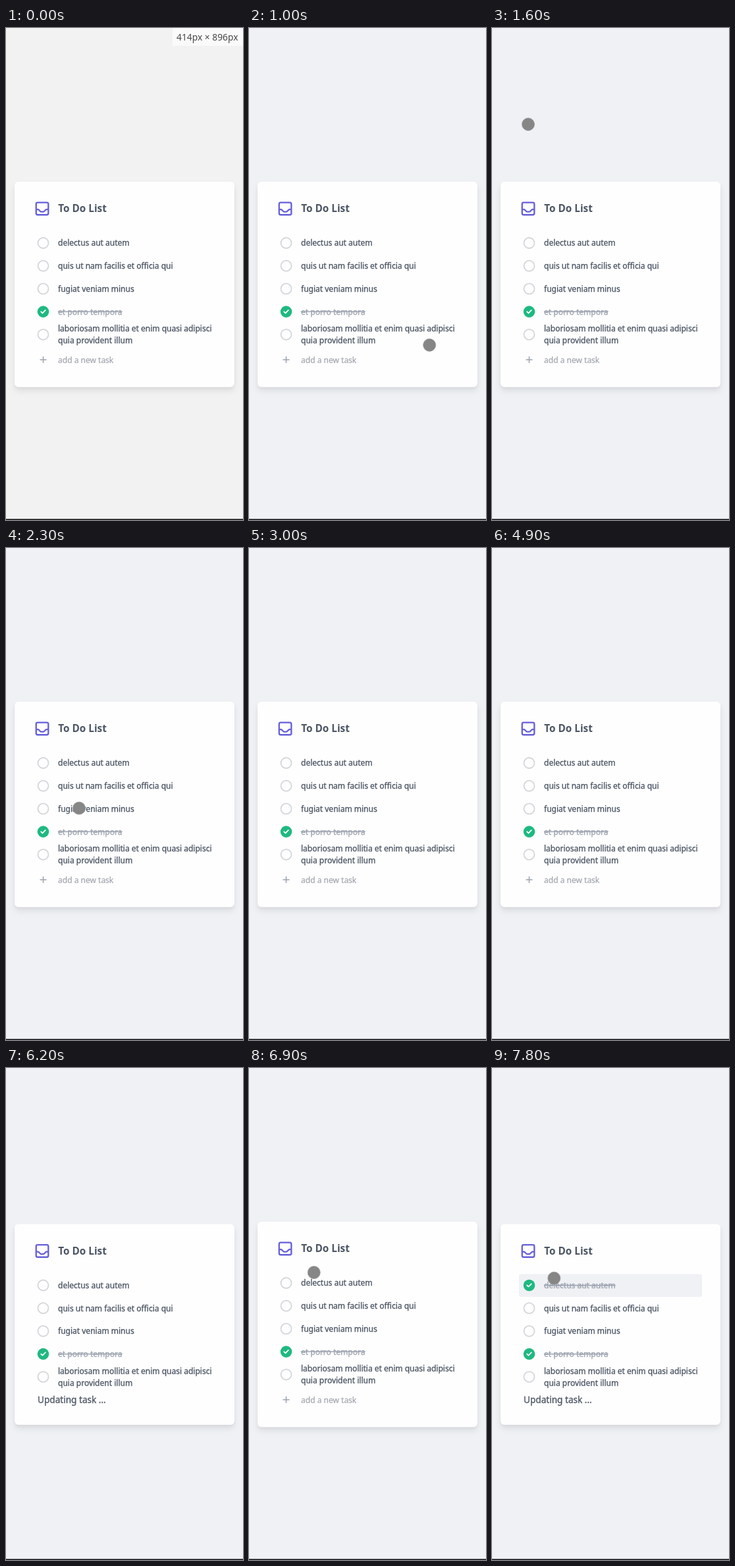
Animation, 360 px wide and 746 px high, one loop 8 s. Source, as an HTML page:

```html
<!DOCTYPE html>
<html lang="en">
<head>
<meta charset="utf-8">
<title>To Do List</title>
<style>
  html, body { margin: 0; width: 100%; height: 100%; overflow: hidden; background: #f0f1f5; }
  svg { display: block; }
  text {
    font: 500 12.02px "Noto Sans", "Open Sans", sans-serif;
    color: #4b5563; fill: currentColor; stroke: currentColor; stroke-width: .32;
  }
  .title { font-size: 15.3px; font-weight: 700; stroke: none; }
  .status { font-size: 13.6px; }
  .muted { color: #a0a4ae; stroke-width: .2; }
  .tag { font-size: 13.8px; font-weight: 400; color: #484848; stroke: none; }
  .ring { fill: #fefefe; stroke: #d3d6db; stroke-width: 1.8; }
  .tick { display: none; }
  .done text { color: #9ca3af; text-decoration: line-through; }
  .done .ring { display: none; }
  .done .tick { display: inline; }
  #card { fill: #fefefe; filter: drop-shadow(0 6px 5px rgba(0,0,0,.08)) drop-shadow(0 2px 2px rgba(0,0,0,.04)); }
</style>
</head>
<body>
<svg width="360" height="746" viewBox="0 0 360 746">
  <rect id="page" width="360" height="746"/>
  <rect id="card" x="13" width="334" rx="6"/>
  <g id="head">
    <path transform="translate(41.1 -13.9) scale(1.16)" fill="none" stroke="#665fd8" stroke-width="2" stroke-linecap="round" stroke-linejoin="round"
      d="M4 13V6a2 2 0 0 1 2-2H18a2 2 0 0 1 2 2V18a2 2 0 0 1-2 2H6a2 2 0 0 1-2-2ZM4 13h2.6a1 1 0 0 1 .7.3l2.4 2.4a1 1 0 0 0 .7.3h3.2a1 1 0 0 0 .7-.3l2.4-2.4a1 1 0 0 1 .7-.3H20"/>
    <text class="title" x="79.3" y="5.4">To Do List</text>
  </g>
  <g id="list"><rect id="hover" x="41" y="309" width="278" height="34.5" rx="3" fill="#f0f1f5"/></g>
  <g id="add">
    <path d="M51.5 503h10M56.5 498v10" stroke="#9ca3af" stroke-width="1.5"/>
    <text class="muted" x="79" y="507.8">add a new task</text>
  </g>
  <text id="updating" class="status" x="48" y="507.7">Updating task ...</text>
  <text id="loading" class="status" x="41" y="416.7">Loading...</text>
  <g id="size">
    <rect x="253" width="107" height="27" fill="#fafafa"/>
    <text class="tag" x="259" y="18.5">414px × 896px</text>
  </g>
  <circle id="touch" r="9.5" fill="#868686" stroke="#969696" stroke-width=".8"/>
  <rect y="744.4" width="360" height="1.6" fill="#16161a"/>
</svg>
<script>
const LOOP = 8000, STEP = 100;
const FIRST_ROW = 326, ROW = 34.7, LINE = 17.8;
const $ = id => document.getElementById(id);

const tasks = [
  'delectus aut autem',
  'quis ut nam facilis et officia qui',
  'fugiat veniam minus',
  'et porro tempora',
  'laboriosam mollitia et enim quasi adipisci|quia provident illum'
];

// Pointer gestures: each eases along a curve (start, bend, end), then rests until it leaves.
const gestures = [
  { from: 900, to: 1600, until: 2000, curve: [[300, 489], [60, 420], [55, 146]] },
  { from: 2000, to: 2600, until: 2700, curve: [[55, 146], [187, 700], [15, 32]] },
  { from: 3800, to: 4500, until: 4600, curve: [[226, 111], [226, 200], [241, 273]] },
  { from: 4600, to: 4800, until: 4900, curve: [[241, 273], [310, 273], [307, 19]] },
  { from: 6900, to: 7400, until: LOOP, curve: [[98.7, 310], [71, 366], [94.3, 318.7]] }
];

const rows = tasks.map((task, i) => {
  const lines = task.split('|');
  const y = FIRST_ROW + i * ROW;
  const baseline = y + 4.4 - (lines.length - 1) * LINE / 2;
  const row = document.createElementNS('http://www.w3.org/2000/svg', 'g');
  row.innerHTML = `<g transform="translate(56.5 ${y})">
      <circle class="ring" r="8"/>
      <g class="tick"><circle r="8.8" fill="#1fb981"/>
      <path d="M-3.3 0l2.2 2.2 4.4-4.4" fill="none" stroke="#fff" stroke-width="1.8" stroke-linecap="round" stroke-linejoin="round"/></g>
    </g>` + lines.map((s, n) => `<text x="79" y="${baseline + n * LINE}">${s}</text>`).join('');
  $('list').append(row);
  return row;
});
rows[3].classList.add('done');

const show = (id, on) => $(id).style.display = on ? '' : 'none';
const within = (t, a, b) => t >= a && t < b;
const moveY = (id, y) => $(id).setAttribute('transform', `translate(0 ${y})`);
const smooth = k => k * k * (3 - 2 * k);
const bezier = (k, a, b, c) => (1 - k) ** 2 * a + 2 * k * (1 - k) * b + k * k * c;

function pointer(t) {
  const g = gestures.find(g => within(t, g.from, g.until));
  if (!g) return null;
  const k = smooth(Math.min(1, (t - g.from) / (g.to - g.from)));
  return [0, 1].map(axis => bezier(k, ...g.curve.map(p => p[axis])));
}

function draw(time) {
  const t = Math.floor(time % LOOP / STEP) * STEP;
  const intro = t < 900;
  const loading = within(t, 3800, 4100);
  const toggled = t >= 7600;
  const updating = toggled || within(t, 6200, 6400);

  const height = loading ? 124.5 : updating ? 304.5 : 311.5;
  const top = 388.7 - height / 2;
  $('card').setAttribute('y', top);
  $('card').setAttribute('height', height);
  moveY('head', top + 41);
  moveY('list', updating ? 3.5 : 0);

  $('page').setAttribute('fill', intro ? '#f2f2f2' : '#f0f1f5');
  show('size', intro);
  show('list', !loading);
  show('add', !loading && !updating);
  show('updating', updating);
  show('loading', loading);
  show('hover', toggled);
  rows[0].classList.toggle('done', toggled);

  const at = pointer(t);
  show('touch', at);
  if (at) $('touch').setAttribute('transform', `translate(${at})`);
}

const start = performance.now();
(function frame() {
  draw(performance.now() - start);
  requestAnimationFrame(frame);
})();
</script>
</body>
</html>
```
